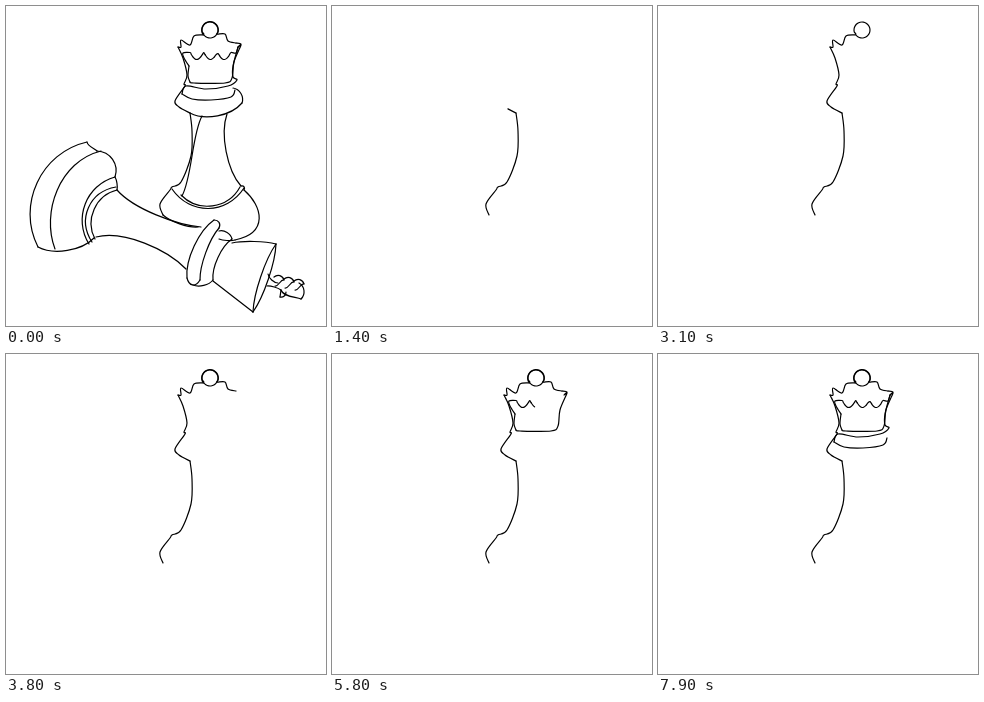
Write an HTML page that moves like this. It is 320 by 320 pixels and loops after 8 s.

```html
<!DOCTYPE html>
<html lang="en">
<head>
<meta charset="utf-8">
<title>Chess line drawing</title>
<style>
  html, body { margin: 0; width: 100%; height: 100%; overflow: hidden; background: #fff; }
  svg { display: block; width: 100vw; height: 100vh; }
  path { fill: none; stroke: #000; stroke-width: 1.2; stroke-linecap: round; stroke-linejoin: round; }
</style>
</head>
<body>
<svg viewBox="0 0 320 320"><g id="rest"></g><g id="pen"></g></svg>
<script>
const LOOP = 8000, TICK = 100, BLANK_TICKS = 5;
const rest = document.getElementById('rest');
const pen = document.getElementById('pen');

function addPath(group, d) {
  const path = document.createElementNS('http://www.w3.org/2000/svg', 'path');
  path.setAttribute('d', d);
  return group.appendChild(path);
}

// Smooth path through [x, y] points.
function curve(points) {
  const at = i => points[Math.max(0, Math.min(points.length - 1, i))];
  const handle = (i, sign) => at(i).map((v, c) => v + sign * (at(i + 1)[c] - at(i - 1)[c]) / 6);
  return 'M' + points[0] + points.slice(1).map((p, i) => `C${handle(i, 1)} ${handle(i + 1, -1)} ${p}`).join('');
}

// Line from one point to another, bulging sideways near its start and its end.
function bow(x0, y0, x1, y1, bulge, endBulge = bulge) {
  const dx = x1 - x0, dy = y1 - y0, length = Math.hypot(dx, dy);
  const control = (t, b) => {
    const push = b * 4 / 3 / length;
    return [x0 + dx * t + dy * push, y0 + dy * t - dx * push];
  };
  addPath(rest, `M${x0},${y0}C${control(.25, bulge)} ${control(.75, endBulge)} ${x1},${y1}`);
}

const sample = (count, point) => Array.from({ length: count + 1 }, (_, i) => point(i / count));

// The ball on the crown, between two angles in degrees.
const ball = (from, to, radius) => sample(16, t => {
  const angle = (from + (to - from) * t) * Math.PI / 180;
  return [204 + radius * Math.cos(angle), 24 + radius * Math.sin(angle)];
});

// The scalloped inner rim, measured in scallops.
const scallops = (from, to) => sample(12, t => {
  const n = from + (to - from) * t;
  return [184 + 13.7 * n, 46.5 + 7 * Math.abs(Math.sin(Math.PI * n))];
});

// Pen strokes follow one another; each takes a number of ticks, then may pause.
const strokes = [];
let nextTick = BLANK_TICKS;
function stroke(ticks, points, pause = 0) {
  const path = addPath(pen, curve(points));
  strokes.push({ start: nextTick, ticks, path, length: path.getTotalLength() });
  nextTick += ticks + pause;
}

// Left outline, from the base up to the crown
stroke(9, [[157, 209], [154, 198], [164, 184], [166, 181], [175, 176], [185, 150], [186, 125], [184, 107]]);
stroke(9, [[184, 107], [173, 101], [169, 95], [179, 80], [178, 78], [181, 69], [177, 52], [172, 41]]);
// Crown
stroke(9, [[172, 41], [175, 41], [175, 34], [184, 39], [188, 30], ...ball(144, 504, 8)]);
stroke(7, [...ball(144, 390, 8.3), [219, 28], [222, 35], [230, 37]], 1);
stroke(9, [[230, 37], [235, 38], [232, 41], [235, 39], [228, 56], [226, 72], [219, 77], [188, 77], [184, 76]]);
stroke(1, [[184, 76], [182, 70], [183, 60]]);
stroke(8, [[183, 60], [178, 52], [177, 47], ...scallops(0, 1.1)]);
stroke(9, [...scallops(1.1, 3), [230, 47], [232, 41]]);
// Bands below the crown
stroke(9, [[232, 41], [227, 60], [227, 71], [231, 74], [222, 80], [200, 83], [180, 80], [176, 88]]);
stroke(4, [[176, 88], [186, 93], [205, 94], [225, 91], [229, 84]]);

// Standing piece: collar, stem, base
bow(184, 107, 236, 97, -8);
bow(236, 97, 227, 82, -4);
bow(221, 108, 235, 180, -8);
bow(196, 110, 176, 190, -4, 4);
bow(166, 183, 238, 182, -20);
bow(175, 189, 234, 181, -15);
bow(235, 180, 238, 184, 2);
bow(238, 184, 229, 234, 16, 24);
bow(229, 234, 213, 233, 1);
bow(157, 209, 192, 221, -3);

// Lying piece: base
bow(81, 136, 32, 241, -28);
bow(95, 145, 49, 243, -25, -21);
bow(32, 241, 88, 232, -8);
bow(81, 136, 91, 145, -2, 0);
bow(91, 145, 109, 171, 8);
bow(109, 171, 111, 184, 1);
bow(109, 171, 83, 238, -18);
bow(110, 181, 86, 236, -17);
bow(111, 184, 89, 233, -13);

// Lying piece: stem, two collar rings
bow(111, 184, 195, 221, -8, -6);
bow(90, 231, 180, 263, 12, 9);
bow(208, 214, 181, 272, -7);
bow(208, 214, 213, 222, 3);
bow(213, 222, 194, 274, -4);
bow(181, 272, 194, 274, -6);
bow(213, 225, 226, 233, 3);
bow(226, 233, 207, 274, -5);
bow(207, 274, 187, 279, 3);

// Lying piece: head and finial
bow(226, 237, 270, 238, 2);
bow(207, 275, 247, 306, 0);
bow(270, 238, 247, 306, 4);
bow(270, 238, 247, 306, -4);
bow(262, 268, 272, 277, -2);
bow(261, 280, 275, 284, 1);
for (let i = 0; i < 3; i++) {
  const x = 268 + 10 * i, y = 271 + 2 * i;
  bow(x, y, x + 10, y + 3, 3);
  bow(x + 1, y + 9, x + 10, y + 3, -2, 2);
}
bow(293, 277, 295, 293, 4);
bow(295, 293, 275, 284, 0, 4);
bow(280, 286, 274, 291, 2);
bow(274, 291, 275, 284, 0);

function draw(now) {
  const tick = Math.floor((now % LOOP) / TICK);
  const complete = tick < BLANK_TICKS;
  rest.style.display = complete ? '' : 'none';
  for (const { start, ticks, path, length } of strokes) {
    const done = complete ? 1 : Math.max(0, Math.min(1, (tick - start + 1) / ticks));
    path.style.display = done ? '' : 'none';
    path.style.strokeDasharray = done < 1 ? `${length * done} ${length * 2}` : 'none';
  }
}

const startTime = performance.now();
function frame() {
  draw(performance.now() - startTime);
  requestAnimationFrame(frame);
}
frame();
</script>
</body>
</html>
```
